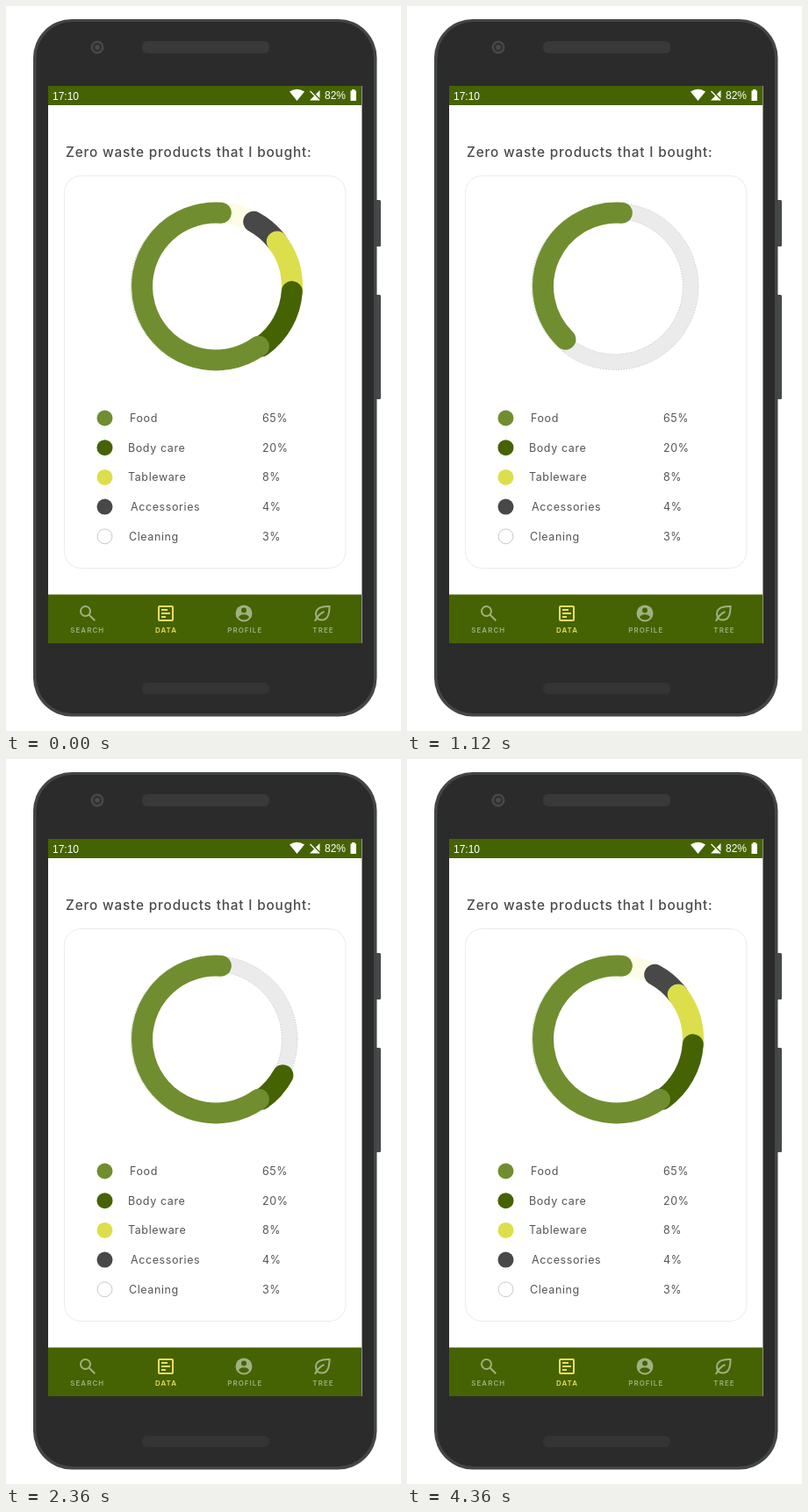
An HTML page that plays this animation: 450 by 826 pixels, repeating every 4.4 s.

```html
<!DOCTYPE html>
<html lang="en">
<head>
<meta charset="utf-8">
<title>Zero waste data</title>
<style>
  html, body { margin: 0; width: 100%; height: 100%; overflow: hidden; background: #fff; }
  svg { display: block; width: 100%; height: 100%; }
  text { font-family: Inter, "Open Sans", sans-serif; }
  .status { font: 12px "Liberation Sans", Arial, sans-serif; fill: #fff; }
  .title { font-size: 15.3px; font-weight: 500; letter-spacing: .85px; fill: #4a4a4a; }
  #legend text { font-size: 12.5px; letter-spacing: .6px; fill: #555; }
  #nav text { font-size: 7.9px; font-weight: 600; letter-spacing: 1.1px; text-anchor: middle; }
  .line { fill: none; stroke: currentColor; stroke-width: 2; }
  #arcs path { fill: none; stroke-width: 24; stroke-linecap: round; }
</style>
</head>
<body>
<svg viewBox="0 0 450 826">
  <!-- phone -->
  <g fill="#47494a">
    <rect x="419" y="221" width="8" height="53" rx="1.5"/>
    <rect x="419" y="329" width="8" height="119" rx="1.5"/>
  </g>
  <rect x="31" y="15" width="391.5" height="794.5" rx="44" fill="#434646"/>
  <rect x="34.5" y="18" width="384.5" height="788" rx="41" fill="#2b2b2b"/>
  <rect x="155" y="40" width="145" height="14" rx="6" fill="#393939"/>
  <rect x="155" y="771" width="145" height="13" rx="6" fill="#343434"/>
  <circle cx="104" cy="47" r="7.5" fill="#484848"/>
  <circle cx="104" cy="47" r="5" fill="#2f2f2f"/>
  <circle cx="104" cy="47" r="2.8" fill="#4a4a4a"/>

  <!-- screen -->
  <rect x="48" y="91" width="358" height="635" fill="#fff"/>
  <path d="M48 91h358v22H48zM48 670.5h358V726H48z" fill="#456302"/>
  <path d="M405.5 91v635" stroke="#8d9487"/>
  <text class="status" x="53" y="107">17:10</text>
  <text class="status" x="363" y="106">82%</text>
  <g fill="#fff">
    <path d="M323 97.5Q331.500 92 340 97.5L331.500 108z"/>
    <path d="M346 107.500L357.500 96v11.500z"/>
    <path d="M394 95h3.500v1.500h1.500v11.500h-6.500v-11.500h1.500z"/>
  </g>
  <path d="M347 96.500l11 11" stroke="#456302" stroke-width="2.500"/>
  <path d="M346.500 97l10.500 10.500" stroke="#fff" stroke-width="1.200"/>

  <text class="title" x="68" y="172">Zero waste products that I bought:</text>
  <rect x="66.5" y="193.500" width="320.500" height="447" rx="19" fill="none" stroke="#ebebeb"/>

  <!-- chart -->
  <circle cx="237" cy="319.500" r="86.200" fill="none" stroke="#ebebeb" stroke-width="17.600"/>
  <g fill="none" stroke="#999" stroke-width=".6" stroke-dasharray="1 2">
    <circle cx="237" cy="319.500" r="95"/>
    <circle cx="237" cy="319.500" r="77.400"/>
  </g>
  <g id="arcs"></g>
  <g id="legend"></g>

  <!-- navigation -->
  <g id="nav" fill="#a1b080" color="#a1b080">
    <circle class="line" cx="90.500" cy="689.500" r="5.500"/>
    <path class="line" d="M94.500 693.500l6.800 6.800"/>
    <text x="92.800" y="714">SEARCH</text>
    <g fill="#ecdc62" color="#ecdc62">
      <rect class="line" x="174" y="684" width="16" height="16" rx="1"/>
      <path class="line" d="M177 688h7M177 692h10M177 696h5"/>
      <text x="182.500" y="714">DATA</text>
    </g>
    <circle cx="271" cy="692" r="9.500"/>
    <g fill="#456302">
      <circle cx="271" cy="688.500" r="3"/>
      <path d="M265 696.500c1-4.500 11-4.500 12 0c-3 4-9 4-12 0z"/>
    </g>
    <text x="272.300" y="714">PROFILE</text>
    <path class="line" d="M368.500 684c-9-.5-15.500 2-15.500 9c0 5 4 6.500 7 6.500c7 0 8.500-7 8.500-15.500zM352 701c2-5 5-8.500 10.500-11"/>
    <text x="361.500" y="714">TREE</text>
  </g>
</svg>
<script>
const LOOP = 4400, RESET = 40, RADIUS = 84, CY = 319.5;

// Angles in degrees clockwise from the top; later items lie underneath.
const items = [
  { name: "Food", x: 141, share: 65, color: "#708e2f", cx: 239, from: 4, to: -215.6, start: 124, end: 1690, soft: 84 },
  { name: "Body care", x: 139, share: 20, color: "#456303", cx: 242, from: 144.4, to: 94, start: 1715, end: 3000 },
  { name: "Tableware", x: 139, share: 8, color: "#dcdf4b", cx: 242, from: 94, to: 52.6, start: 3000, end: 3680 },
  { name: "Accessories", x: 142, share: 4, color: "#484848", cx: 242, from: 52.6, to: 28.6, start: 3680, end: 4050 },
  { name: "Cleaning", x: 140, share: 3, color: "#fdfde6", dot: "#fff", cx: 242, from: 28.6, to: 5, start: 4050, end: 4330 }
];

function add(parent, tag, attrs, text = "") {
  const el = document.createElementNS("http://www.w3.org/2000/svg", tag);
  for (const key in attrs) el.setAttribute(key, attrs[key]);
  el.textContent = text;
  return parent.appendChild(el);
}

const arcs = document.getElementById("arcs");
const legend = document.getElementById("legend");

items.forEach((item, i) => {
  const y = 469.5 + i * 33.7;
  add(legend, "circle", {
    cx: 112.5, cy: y, r: item.dot ? 8.4 : 9,
    fill: item.dot || item.color, stroke: item.dot ? "#c8c8c8" : "none"
  });
  add(legend, "text", { x: item.x, y: y + 4.5 }, item.name);
  add(legend, "text", { x: 292, y: y + 4.5 }, item.share + "%");
});
for (const item of [...items].reverse()) item.path = add(arcs, "path", { stroke: item.color });

function point(cx, deg) {
  const a = deg * Math.PI / 180;
  return (cx + RADIUS * Math.sin(a)).toFixed(2) + " " + (CY - RADIUS * Math.cos(a)).toFixed(2);
}

// Time travelled at full speed; a soft start eases in around the start time.
function travelled(t, { start, soft = 0 }) {
  const d = t - start;
  if (d >= soft) return d;
  return d > -soft ? (d + soft) ** 2 / (4 * soft) : 0;
}

function draw(t) {
  for (const item of items) {
    const p = t < RESET ? 1 : Math.min(1, travelled(t, item) / (item.end - item.start));
    const sweep = (item.to - item.from) * p;
    const large = Math.abs(sweep) > 180 ? 1 : 0;
    item.path.setAttribute("d", p > 0
      ? `M${point(item.cx, item.from)}A${RADIUS} ${RADIUS} 0 ${large} 0 ${point(item.cx, item.from + sweep)}`
      : "");
  }
}

function frame() {
  draw(performance.now() % LOOP);
  requestAnimationFrame(frame);
}
frame();
</script>
</body>
</html>
```
